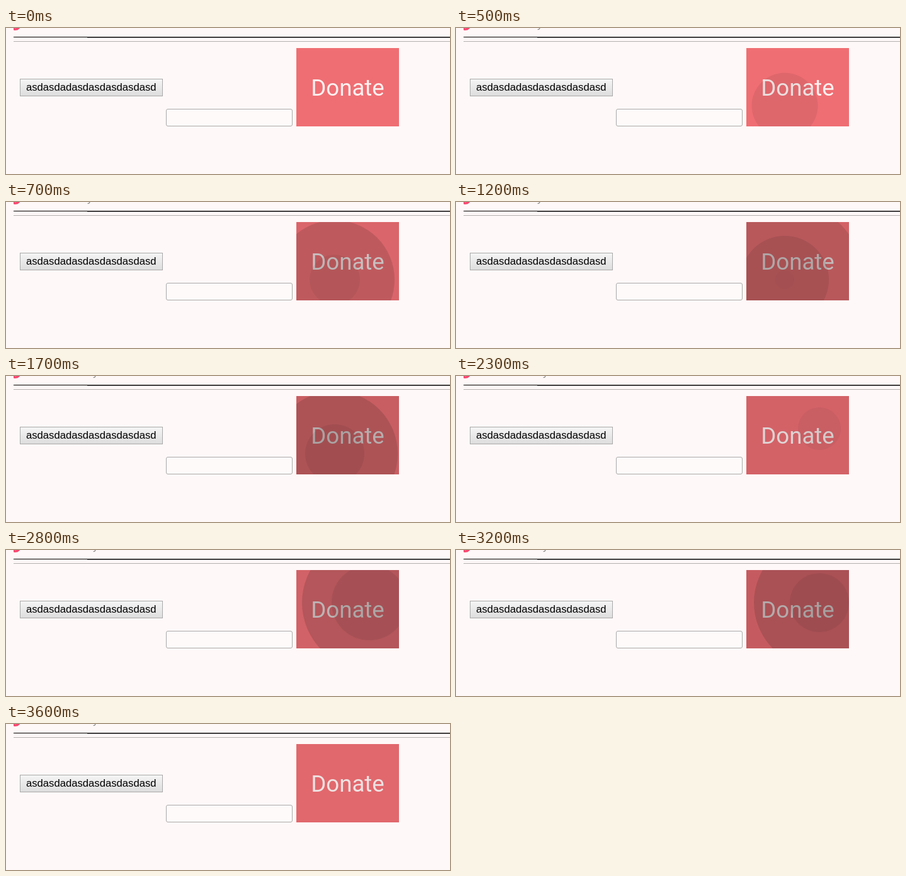
Recreate the animation shown at these times as an HTML page. Size 705 px wide and 233 px high, loop 3900 ms.

```html
<!DOCTYPE html>
<html>
<head>
<meta charset="utf-8">
<style>
html, body { margin: 0; width: 100%; height: 100%; overflow: hidden; background: #fff8f8; }
svg { display: block; }
.ui { font: 16.67px Arial, "Liberation Sans", sans-serif; }
.donate { font: 36.7px Roboto, sans-serif; fill: #fdf0f0; text-anchor: middle; }
</style>
</head>
<body>
<svg width="705" height="233" viewBox="0 0 705 233">
  <defs>
    <linearGradient id="face" x2="0" y2="1">
      <stop stop-color="#f5f5f5"/><stop offset="1" stop-color="#dddddd"/>
    </linearGradient>
    <clipPath id="tile"><rect x="461" y="32" width="163" height="125"/></clipPath>
    <clipPath id="page"><rect x="12" width="693" height="233"/></clipPath>
  </defs>
  <circle cx="15" cy="-5" r="7" fill="none" stroke="#f8456d" stroke-width="3.5" clip-path="url(#page)"/>
  <text id="tail" class="ui" y="0" fill="#8c8888">y</text>
  <path d="M12 14.5H705M129 15H705" stroke="#000"/>
  <path d="M12 21.5H705" stroke="#b4b0b0"/>

  <rect x="22.5" y="81.5" width="226" height="27" fill="url(#face)" stroke="#a9a9a9"/>
  <text class="ui" x="32" y="100">asdasdadasdasdasdasdasd</text>
  <rect x="254.5" y="129.5" width="200" height="27" rx="2.5" fill="#fffafa" stroke="#a9a9a9"/>

  <g clip-path="url(#tile)">
    <rect x="461" y="32" width="163" height="125" fill="#ef6e73"/>
    <text class="donate" x="542.5" y="108">Donate</text>
    <g id="waves" fill="#1a1a1a"></g>
  </g>
</svg>
<script>
const LOOP = 3900, STEP = 100, LAST = 3600, SPEED = 0.5, PEAK = 220;
const tail = document.getElementById("tail");
const waves = document.getElementById("waves");

// Two bursts of clicks, each at its own spot
const bursts = [
  { x: 522, y: 124, times: [395, 510, 620, 730, 840, 950, 1060, 1170, 1280, 1390, 1500, 1606, 1716, 1826, 1936] },
  { x: 577, y: 84, times: [2232, 2350, 2468, 2586, 2680, 2800, 2896, 2992, 3106] }
];
const clicks = bursts.flatMap(b => b.times.map(time => ({ x: b.x, y: b.y, time })));

const opacity = age => age < PEAK ? 0.00075 * age : 0.165 * Math.exp((PEAK - age) / 160);

function draw(t) {
  tail.style.visibility = t < 100 ? "hidden" : "visible";
  tail.setAttribute("x", t < 1400 ? 129 : 138);
  waves.innerHTML = clicks
    .filter(c => t > c.time && t - c.time < 900)
    .map(c => {
      const age = t - c.time;
      return `<circle cx="${c.x}" cy="${c.y}" r="${age * SPEED}" opacity="${opacity(age)}"/>`;
    }).join("");
}

const start = performance.now();
function tick() {
  const t = (performance.now() - start) % LOOP;
  draw(Math.min(LAST, Math.floor(t / STEP) * STEP));
  requestAnimationFrame(tick);
}
tick();
</script>
</body>
</html>
```
